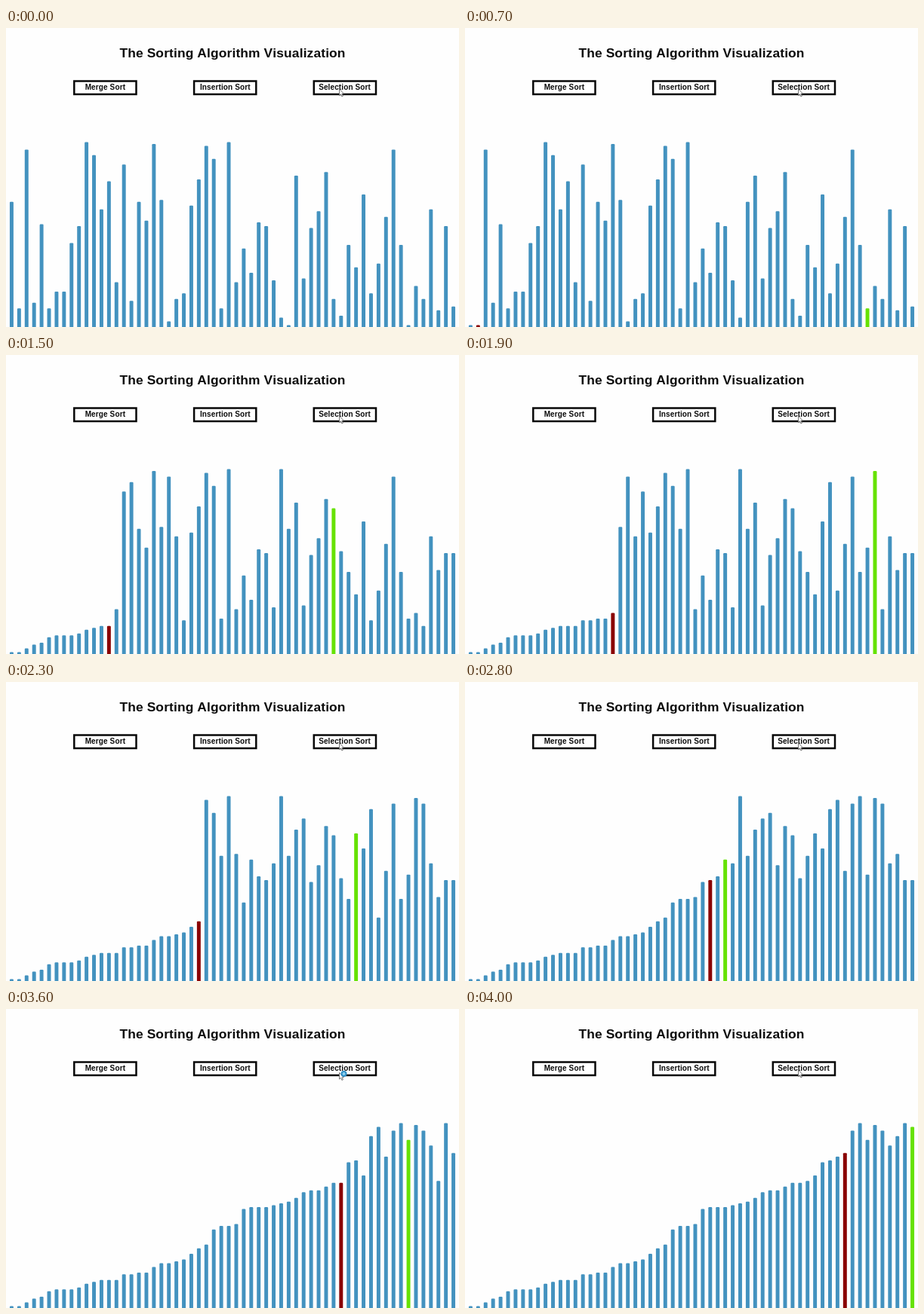
An HTML page for the animation above (4.1 s loop, 600 by 397 pixels).

```html
<!DOCTYPE html>
<html lang="en">
<head>
<meta charset="utf-8">
<title>Sorting</title>
<style>
  html, body { margin: 0; width: 600px; height: 397px; overflow: hidden; background: #fefefe; }
  svg { display: block; }
  text { font: bold 10px "Liberation Sans", Arial, sans-serif; letter-spacing: .12px; text-anchor: middle; font-kerning: none; fill: #0c0c0c; }
  .title { font-size: 17.4px; letter-spacing: .13px; }
  .box { fill: #fff; stroke: #080808; stroke-width: 2.5; }
  .bar { fill: #4392bf; }
  .bar.min { fill: #8a0303; }
  .bar.swapped { fill: #66e204; }
</style>
</head>
<body>
<svg width="600" height="397" viewBox="0 0 600 397">
  <text class="title" x="300" y="39">The Sorting Algorithm Visualization</text>
  <rect class="box" x="90.3" y="70.5" width="82.2" height="17.5"/>
  <rect class="box" x="249.1" y="70.5" width="82.2" height="17.5"/>
  <rect class="box" x="407.8" y="70.5" width="82.2" height="17.5"/>
  <text x="131.4" y="82">Merge Sort</text>
  <text x="290.3" y="82">Insertion Sort</text>
  <text x="448.6" y="82">Selection Sort</text>
  <g id="bars"></g>
  <g id="cursor">
    <path d="M0 0V8.6L2 6.9L3.4 10L4.9 9.3L3.5 6.3H6Z" fill="#fff" stroke="#555" stroke-width=".8"/>
    <circle id="busy" cx="6" cy="1.6" r="3" fill="#8fd0ee" stroke="#2f8fc6" stroke-width="2"/>
  </g>
</svg>
<script>
const LOOP = 4100, TICK = 100, STAGE_H = 397;
const SCALE = 600 / 1210, UNIT = 2.48;
const START = [
  67, 10, 95, 13, 55, 10, 19, 19, 45, 54, 99, 92, 63, 78, 24,
  87, 14, 67, 57, 98, 68, 3, 15, 18, 65, 79, 97, 90, 10, 99,
  24, 42, 29, 56, 54, 25, 5, 1, 81, 26, 53, 62, 83, 15, 6,
  44, 32, 71, 18, 34, 59, 95, 44, 1, 22, 15, 63, 9, 54, 11
];

const cursor = document.getElementById("cursor");
const busy = document.getElementById("busy");
const group = document.getElementById("bars");

const bars = START.map((_, i) => {
  const bar = document.createElementNS("http://www.w3.org/2000/svg", "rect");
  bar.setAttribute("x", (10 + 20 * i) * SCALE);
  bar.setAttribute("width", 10 * SCALE);
  bar.setAttribute("rx", 1.2);
  group.append(bar);
  return bar;
});

// Selection sort, halted right after the swap of the given pass
function sortUpTo(last) {
  const values = [...START];
  let swapped = -1;
  for (let i = 0; i <= last; i++) {
    let min = i;
    for (let j = i + 1; j < values.length; j++) {
      if (values[j] < values[min]) min = j;
    }
    [values[i], values[min]] = [values[min], values[i]];
    swapped = min;
  }
  return { values, swapped };
}

function draw(tick) {
  const pass = Math.floor(1.5 * tick - 9.5);
  const { values, swapped } = sortUpTo(pass);
  bars.forEach((bar, i) => {
    const h = values[i] * UNIT;
    bar.setAttribute("y", STAGE_H - h);
    bar.setAttribute("height", h + 4);
    bar.setAttribute("class", "bar" + (i === pass ? " min" : i === swapped ? " swapped" : ""));
  });
  const waiting = tick === 36 || tick === 37;
  busy.style.display = waiting ? "" : "none";
  cursor.setAttribute("transform", `translate(441.5 ${waiting ? 84.5 : 81})`);
}

let shown = -1;
function run() {
  const tick = Math.floor((performance.now() % LOOP) / TICK);
  if (tick !== shown) draw(shown = tick);
  requestAnimationFrame(run);
}
run();
</script>
</body>
</html>
```
